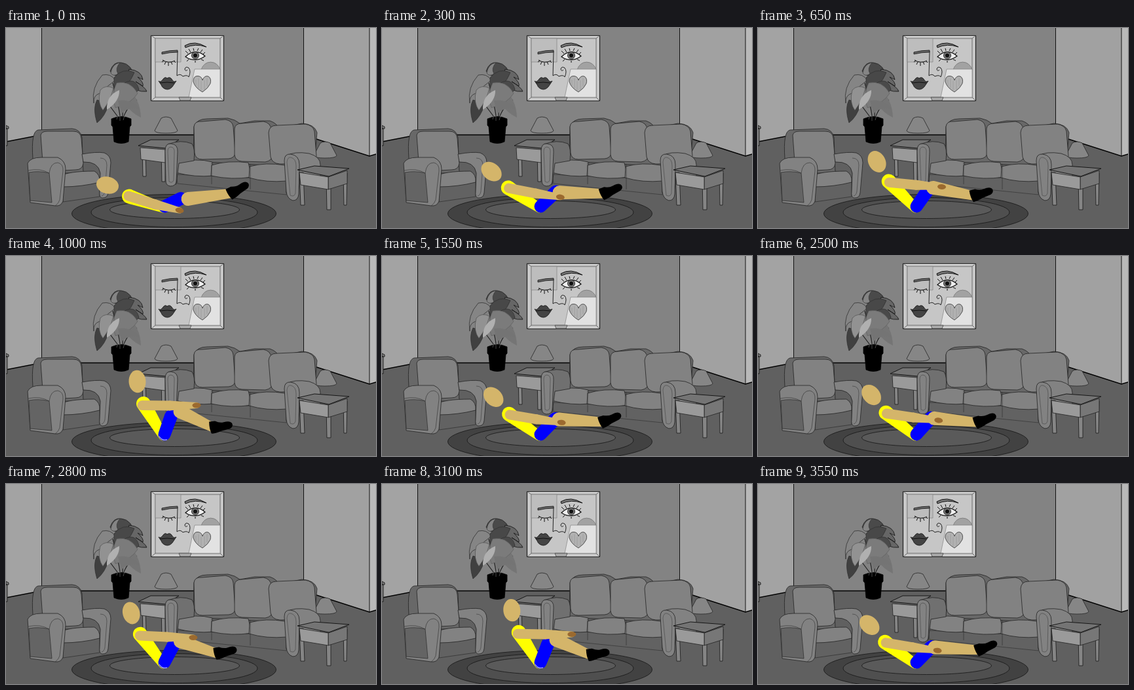
An HTML page with a canvas that plays this animation: 565 by 306 pixels, repeating every 3600 ms.

```html
<!DOCTYPE html>
<html lang="en">
<head>
<meta charset="utf-8">
<title>Sit-ups in the living room</title>
<style>
html, body { margin: 0; width: 100%; height: 100%; overflow: hidden; background: #606060; }
canvas { display: block; }
</style>
</head>
<body>
<canvas id="stage" width="565" height="306"></canvas>
<script>
const stage = document.getElementById('stage');
const room = document.createElement('canvas');
room.width = 565;
room.height = 306;
let ctx = room.getContext('2d');

const INK = '#242424', CLOTH = '#828282', SHADE = '#686868';
const SKIN = '#d4b56a', YELLOW = '#ffff00', BLUE = '#0000ff', HAND = '#9b6a2f';
const LOOP = 3600, REP = 2000;

function shape(d, fill, stroke = INK, width = 0.8) {
  const path = new Path2D(d);
  if (fill) { ctx.fillStyle = fill; ctx.fill(path); }
  if (stroke) { ctx.strokeStyle = stroke; ctx.lineWidth = width; ctx.stroke(path); }
}

function oval(x, y, rx, ry, fill, stroke = null, turn = 0) {
  ctx.beginPath();
  ctx.ellipse(x, y, rx, ry, turn, 0, Math.PI * 2);
  ctx.fillStyle = fill;
  ctx.fill();
  if (stroke) { ctx.strokeStyle = stroke; ctx.lineWidth = 0.8; ctx.stroke(); }
}

function drawWalls() {
  shape('M0 0H565V306H0Z', '#606060', null);
  shape('M54 0H454V163H54Z', '#838383', null);
  shape('M0 0H54V164L0 174Z', '#a3a3a3', null);
  shape('M454 0H555V196L454 163Z', '#a1a1a1', null);
  shape('M555 0H565V193L555 196Z', '#b9b9b9', null);
  shape('M54.5 0V164M454.5 0V163M555 0V196', null, '#111', 1);
  shape('M0 174L54 163.5H454L555 196L565 193', null, '#000', 1.5);
  shape('M0 149L4 151V154H0ZM0 154H2V180H0', '#777', '#111');
}

function drawRug() {
  oval(256.5, 284, 156, 29.5, '#424242', '#161616');
  oval(257, 282, 127, 22.5, '#4f4f4f', '#161616');
  oval(257.5, 278, 99, 13.5, '#5a5a5a', '#161616');
}

function drawPicture() {
  shape('M221.5 11.5H332.5V111.5H221.5Z', '#c9c9c9', '#222', 1.2);
  shape('M228 16H327V106H228Z', '#c6c6c6', '#555');
  shape('M221 11L228 16M333 11L327 16M221 112L228 106M333 112L327 106', null, '#555');
  shape('M228 16H267V52H228Z', '#bdbdbd', '#777', 0.6);
  shape('M298 64A15 16 0 0 1 327 64Z', '#a2a2a2', '#666', 0.6);
  shape('M288 63H327V106H279Z', '#e2e2e2', '#777', 0.6);
  shape('M264 106L266 111H281L283 106Z', '#aaa', '#444');
  // Winking eye, nose and open eye
  shape('M238 37Q250 34 262 34V37Q250 37 238 40Z', '#666', '#111', 0.8);
  shape('M239 49Q248 55 258 50M241 50L238 52M244 52L242 56M248 53V58M252 52L254 56M256 50L259 53', null, '#111', 1);
  shape('M262 36L261 73Q266 69 270 74Q277 71 279 75Q283 66 279 61Q274 58 273 63Q274 67 277 64', null, '#222', 1);
  shape('M273 27Q288 18 306 29Q289 23 274 30Z', '#777', '#111', 1);
  shape('M274 44Q289 30 304 43Q289 54 274 44Z', '#eee', '#111', 1.2);
  oval(289, 42, 5.5, 5.5, '#777', '#111');
  oval(289, 42, 3, 3, '#111');
  shape('M278 39L274 35M282 37L279 32M287 35L286 31M292 35L294 31M297 37L300 33M301 40L304 37M279 48L276 51M289 50V53M298 48L302 50', null, '#111', 1);
  // Lips and heart
  shape('M233 81Q236 84 240 78Q243 74 246 77Q250 74 253 78Q256 84 260 81L256 87Q252 94 246 94Q239 93 237 87Z', '#444', '#111');
  shape('M235 84Q246 82 257 84', null, '#111', 1);
  shape('M300 98Q288 91 286 82Q286 73 293 73.5Q299 74 300 80Q303 72 309 74Q314 77 312 85Q309 92 300 98Z', '#b2b2b2', '#333');
  shape('M290 79V88M294 77V92M298 81V95M303 80V94M307 77V89', null, '#888', 0.5);
}

function drawPlant() {
  shape('M175 140Q171 112 163 84M177 140Q180 110 191 82M174 140Q160 122 148 104M178 140Q185 119 200 110', null, '#222', 1.2);
  shape('M185 92Q205 108 206 137Q191 130 179 113Z', '#757575', null);
  shape('M159 66Q164 51 176 53Q193 55 196 77Q182 68 174 71Q165 76 159 66Z', '#4a4a4a');
  shape('M160 69Q162 55 174 53Q166 62 171 70Q164 75 160 69Z', '#858585', '#333', 0.6);
  shape('M188 63Q207 65 209 79L201 75Q211 84 209 89L198 82Q213 91 215 97Q198 99 183 83Z', '#666', '#111');
  shape('M147 72Q160 69 167 80Q157 87 143 100Q133 103 134 115Q130 91 147 72Z', '#858585', '#333');
  shape('M139 110Q132 123 139 145Q151 136 157 116Z', '#404040', '#333');
  shape('M165 76Q178 60 196 68Q187 91 165 99Z', '#484848', '#333');
  shape('M181 84Q198 75 203 94Q194 107 179 101Z', '#4a4a4a', '#333');
  shape('M144 95Q152 86 164 92Q160 110 148 126Q139 114 144 95Z', '#929292', '#444', 0.6);
  shape('M169 84Q190 80 201 100Q191 116 167 122Q160 103 169 84Z', '#7b7b7b', '#555', 0.5);
  shape('M154 125Q153 103 173 95Q174 112 154 125Z', '#b0b0b0', null);
  shape('M171 111Q192 108 205 125Q187 119 176 132Z', '#747474', null);
  // Pot
  shape('M161 139Q176 132 191 139V149L189 151L187 174Q176 179 165 174L163 151L161 149Z', '#000', '#000');
  shape('M169 140L171 133M174 142V134M179 141L181 134', null, '#777', 0.6);
}

function drawTable(top, apron, legs, side) {
  shape(legs, '#858585', '#181818');
  shape(side, '#777', '#222');
  shape(apron, '#9a9a9a', '#222');
  shape(top, '#747474', '#161616', 1);
}

function drawLamp(x, y) {
  shape(`M${x + 10} ${y}Q${x + 17} ${y - 4} ${x + 25} ${y}L${x + 35} ${y + 19}Q${x + 34} ${y + 23} ${x + 17} ${y + 23}Q${x + 1} ${y + 23} ${x} ${y + 19}Z`, '#868686', '#262626');
}

function drawArmchair() {
  shape('M41 200Q38 158 49 156L101 154Q113 155 116 167L118 222H50Z', SHADE);
  shape('M53 164Q54 158 63 158H103Q114 158 115 169L118 207Q117 217 106 217L68 219Q58 217 56 205Z', CLOTH);
  shape('M87 236L143 234V258L87 266Z', '#626262', '#333');
  shape('M82 227Q94 219 135 219Q144 224 143 236Q115 243 87 243Z', CLOTH);
  shape('M116 193Q138 189 150 191Q160 195 160 206L156 252Q155 261 146 260Q142 258 143 250L144 222Q141 204 118 205Z', CLOTH);
  shape('M144 199Q154 199 154 210L151 250Q150 256 146 257', null, '#444', 0.7);
  shape('M33 207Q37 198 54 198H79Q91 203 91 216L87 265Q84 273 75 272L37 267Z', CLOTH);
  shape('M35 221Q50 218 66 222L70 267L37 264Z', '#646464', '#333');
  shape('M34 218Q52 214 66 222Q68 206 79 206Q88 208 87 219L82 263Q80 269 75 272', null, '#3b3b3b', 0.7);
}

function drawSofa() {
  shape('M286 204L287 151Q291 139 307 139L339 138Q350 140 357 146L380 142H403Q414 146 416 153L452 146Q471 147 475 160L470 214Z', SHADE);
  shape('M287 151Q288 142 299 143L335 140Q346 142 347 151L350 191Q349 199 340 200L300 201Q289 201 288 191Z', CLOTH);
  shape('M349 154Q350 146 360 146L393 143Q404 145 405 155L407 195Q406 203 396 205L360 204Q350 203 349 194Z', CLOTH);
  shape('M401 160Q402 149 413 149L457 147Q469 149 471 158L474 196Q473 207 462 207L418 208Q406 207 404 197Z', CLOTH);
  shape('M260 224L430 232L428 255L262 238Z', '#626262', '#3a3a3a');
  shape('M262 207Q290 198 315 205L317 226Q289 229 259 221Z', CLOTH);
  shape('M314 210Q338 202 370 206L375 228Q345 233 313 226Z', CLOTH);
  shape('M372 212Q396 205 426 210L429 234Q398 237 371 229Z', CLOTH);
  shape('M314 206V239M373 208V247', null, '#363636', 0.7);
  shape('M247 178Q267 170 284 177Q289 184 287 203L264 207L260 239H252Z', '#707070');
  shape('M243 188Q243 176 252 177Q263 178 262 190L260 235Q259 242 251 242Q244 241 244 234Z', CLOTH);
  shape('M247 189Q247 182 252 182Q258 183 257 191L256 233Q254 238 249 235Z', null, '#444', 0.6);
  shape('M427 196Q440 188 463 192Q480 197 480 209V230L449 236L443 263L428 252Z', CLOTH);
  shape('M425 203Q425 192 435 193Q448 195 448 209L447 254Q446 264 438 264Q429 261 428 250Z', CLOTH);
  shape('M429 205Q430 197 435 198Q443 200 443 211L442 253Q440 259 434 256Z', null, '#444', 0.6);
}

function drawRoom() {
  drawWalls();
  drawRug();
  drawPicture();
  drawPlant();
  drawLamp(227, 138);
  drawTable('M202 180L221 171H264L244 184Z', 'M205 183L243 186V206L206 201Z',
    'M208 184H213L214 227H209ZM237 187H243V235H238Z', 'M243 186L262 174V194L243 206Z');
  drawArmchair();
  drawLamp(470, 176);
  drawSofa();
  drawTable('M445 217L471 211L524 215L493 227Z', 'M448 221L492 228V247L450 240Z',
    'M448 221H454L456 271H450ZM489 229H496V278H490ZM515 222H521L520 271H516Z', 'M492 228L521 218V238L492 247Z');
}

// Tapered limb between two round joints
function limb([x1, y1], [x2, y2], r1, r2, color) {
  const angle = Math.atan2(y2 - y1, x2 - x1);
  const spread = Math.acos((r1 - r2) / Math.hypot(x2 - x1, y2 - y1));
  ctx.beginPath();
  ctx.arc(x1, y1, r1, angle + spread, angle - spread + Math.PI * 2);
  ctx.arc(x2, y2, r2, angle - spread, angle + spread);
  ctx.closePath();
  ctx.fillStyle = color;
  ctx.fill();
}

// Curve through low, middle and high poses
const MID = 0.43;
const blend = (p, low, mid, high) => low.map((a, i) =>
  a * (p - MID) * (p - 1) / MID +
  mid[i] * p * (p - 1) / (MID * (MID - 1)) +
  high[i] * p * (p - MID) / (1 - MID));

const LIFT = [[0, 0], [0.3, 0.36], [0.45, 0.435], [0.5, 0.5], [0.9, 0.965], [1, 1]];

function liftAt(ms) {
  const phase = ms % REP / (REP / 2);
  const u = phase < 1 ? phase : 2 - phase;
  const i = Math.max(1, LIFT.findIndex(([x]) => x >= u));
  const [x0, y0] = LIFT[i - 1], [x1, y1] = LIFT[i];
  return y0 + (y1 - y0) * (u - x0) / (x1 - x0);
}

function drawShoe([x, y], angle) {
  ctx.save();
  ctx.translate(x, y);
  ctx.rotate(angle);
  shape('M-4 -9L5 -9Q12 -5 18 -6Q29 -8 31 -2Q32 3 26 5L13 7Q4 10 -2 9.5Q-5 2 -4 -9Z', '#000', null);
  ctx.restore();
}

function drawFigure(p) {
  const shoulder = blend(p, [188, 257.5], [194, 242], [210, 226]);
  const arm = blend(p, [187, 257], [195, 243], [208, 228.5]);
  const elbow = blend(p, [228, 270], [236, 250], [250, 229]);
  const hand = blend(p, [265, 279], [274, 255], [291, 228.5]);
  const knee = blend(p, [278, 261.5], [270, 250], [266, 238]);
  const thigh = blend(p, [267, 261], [265, 249], [252, 245]);
  const ankle = blend(p, [343, 253], [336, 254], [315, 262]);
  const head = blend(p, [155, 240.5], [170, 216], [200.5, 192]);
  const [shoeTurn] = blend(p, [-0.47], [-0.34], [-0.1]);

  oval(...head, 17.2, 13, SKIN, null, 0.25 + 1.25 * p);
  limb(shoulder, [240, 275.5], 11, 7, YELLOW);
  limb([242, 273], thigh, 9.5, 10, BLUE);
  if (p > 0.75) shape('M234 276Q238 283 246 281', null, '#e8e8ff', 1);
  limb(knee, ankle, 10.5, 7, SKIN);
  drawShoe(ankle, shoeTurn);
  limb(arm, elbow, 7.5, 7.5, SKIN);
  limb(elbow, hand, 7.5, 4.5, SKIN);
  const reach = Math.atan2(hand[1] - elbow[1], hand[0] - elbow[0]);
  oval(...hand, 6.5, 4, HAND, null, reach);
}

drawRoom();
ctx = stage.getContext('2d');
const start = performance.now();

function frame(now) {
  const time = Math.max(0, now - start) % LOOP;
  ctx.drawImage(room, 0, 0);
  drawFigure(liftAt(Math.floor(time / 50) * 50));
  requestAnimationFrame(frame);
}
frame(start);
</script>
</body>
</html>
```
